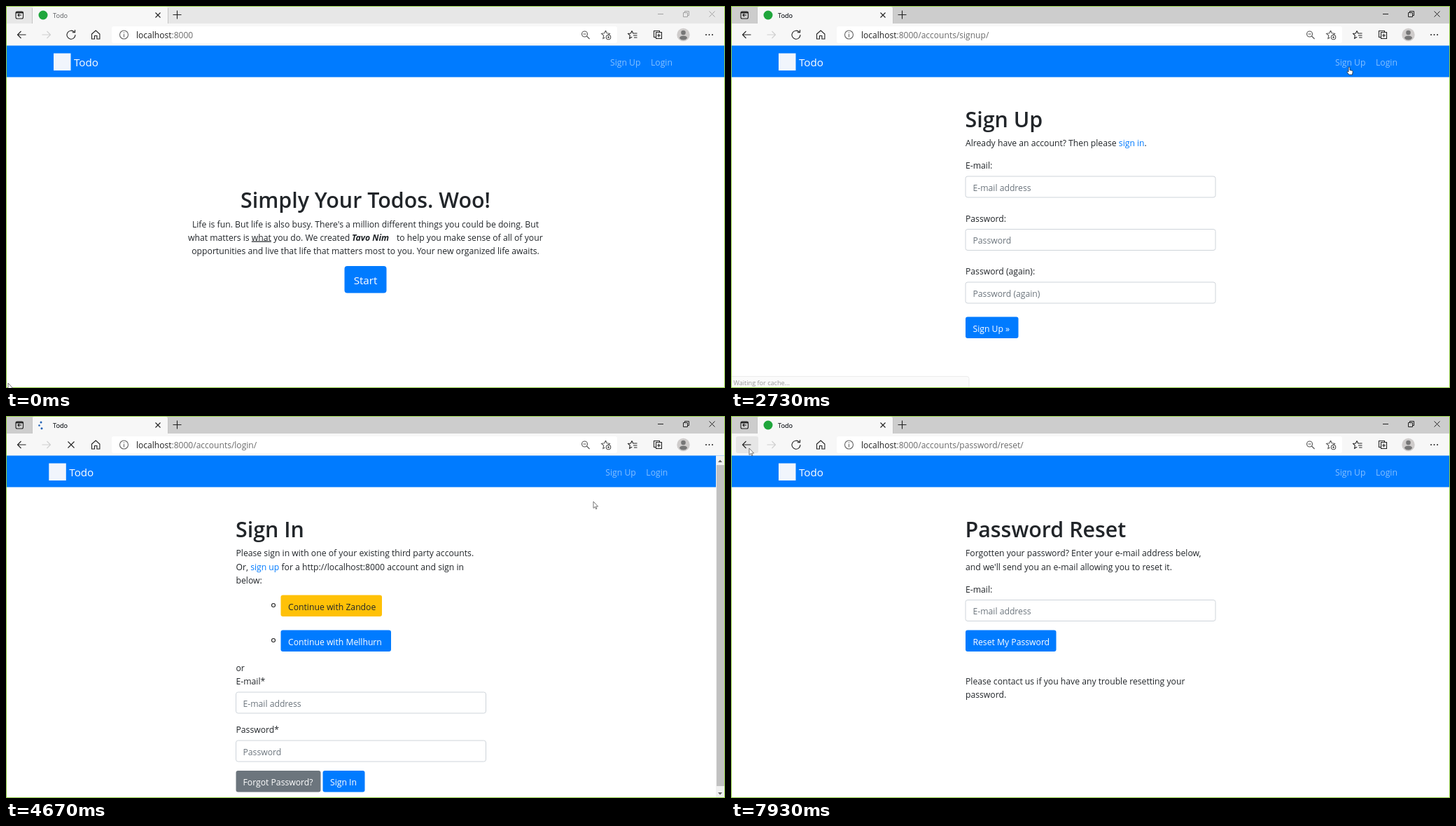
Write an HTML page that moves like this. It is 1027x545 px and loops after 8000 ms.

```html
<!DOCTYPE html>
<html lang="en">
<head>
<meta charset="utf-8">
<title>Todo</title>
<style>
@property --t { syntax: '<number>'; inherits: true; initial-value: 0; }
html, body { margin: 0; width: 100%; height: 100%; overflow: hidden; background: #fff; }
svg { display: block; width: 100%; height: 100%; animation: clock 8s linear infinite; }
text { font: 12.2px 'Open Sans', 'Noto Sans', sans-serif; fill: #212529; white-space: pre; }

/* Visible while the clock is between --a and --b (ms), with --f ms of fade. */
.on {
  --a: -1; --b: 8001; --f: 1;
  opacity: calc(clamp(0, (var(--t) - var(--a)) / var(--f), 1) * clamp(0, (var(--b) - var(--t)) / var(--f), 1));
}
@keyframes clock { from { --t: 0; } to { --t: 8000; } }

.h1 { font-size: 30.4px; font-weight: 600; }
.mid { text-anchor: middle; }
.big { font-size: 15.2px; }
.small { font-size: 9.1px; }
.url { font-size: 12.05px; fill: #6b6b6b; }
.dark { fill: #1f1f1f; }
.white { fill: #fff; }
.link, .blue { fill: #007bff; }
.hint { fill: #6c757d; }
.status { font-size: 9.1px; fill: #444; }
.field { fill: #fff; stroke: #ced4da; }
.bubble { fill: #f7f7f7; stroke: #dcdcdc; }
.line { fill: none; stroke: #222; stroke-width: 1.1; }

.home { --b: 2400; }
.signup { --a: 2400; --b: 4470; }
.login { --a: 4470; --b: 6400; }
.reset { --a: 6400; }

#cursor { animation: roam 8s ease-in-out infinite; }
@keyframes roam {
  0%, .875% { transform: translate(3px, 538px); }
  10.9%, 11.6% { transform: translate(927px, 90px); }
  21.6% { transform: translate(930px, 87px); }
  23.4%, 34.1% { transform: translate(883px, 87px); }
  44.1%, 54.4% { transform: translate(933px, 84px); animation-timing-function: ease-out; }
  58.4% { transform: translate(839px, 122px); animation-timing-function: linear; }
  60% { transform: translate(808px, 145px); animation-timing-function: ease-in-out; }
  68.4%, 72.5% { transform: translate(430px, 414px); }
  76.6%, 85.9% { transform: translate(410px, 530px); }
  95.9%, 96.6% { transform: translate(24px, 54px); }
  99.1%, 100% { transform: translate(26px, 46px); }
}
#spinner { transform-origin: 53px 13px; animation: spin 1s linear -.33s infinite; }
@keyframes spin { to { transform: rotate(360deg); } }
</style>
</head>
<body>
<svg viewBox="0 0 1027 545">
  <defs>
    <g id="nav">
      <rect x="68" y="67.500" width="24.500" height="24.500" fill="#f1f5fc"/>
      <text class="big white" x="97" y="85.500">Todo</text>
      <g opacity=".52">
        <text class="white" x="863" y="84.500">Sign Up</text>
        <text class="white" x="921" y="84.500">Login</text>
      </g>
    </g>
    <rect id="field" class="field" x=".5" y=".5" width="357" height="30" rx="3"/>
    <g id="window" fill="none">
      <path d="M931 11.500h8M1004.500 7.500l8 8m0-8l-8 8"/>
      <path d="M967.500 9.500h6v6h-6zM969.500 9.500v-2h6v6h-2"/>
    </g>
    <path id="hand" d="M-1 1a1 1 0 0 1 2 0V4.500L4.300 5.200Q5.300 5.500 5.200 6.800L4.500 11H-.4L-3 7.300Q-3.200 6-2.200 6L-1 7Z" fill="#fff" stroke="#222" stroke-width=".8"/>
    <path id="arrow" d="M0 0V9.500L2.200 7.500 3.700 10.800 5 10.200 3.600 7.100H6.600Z" fill="#fff" stroke="#555" stroke-width=".8"/>
    <circle id="favicon" cx="53" cy="13" r="6.500" fill="#1fa63c"/>
  </defs>

  <!-- tab strip -->
  <rect width="1027" height="545" fill="#fff"/>
  <rect width="1027" height="26" fill="#e7e7e7"/>
  <rect class="on" style="--a:2270" width="1027" height="26" fill="#cdcdcd"/>
  <rect y="25" width="1027" height="32" fill="#f7f7f7"/>
  <path d="M37.500 26V4q0-3 3-3H228q3 0 3 3V26Z" fill="#f7f7f7"/>
  <path d="M37.500 25V3M231.500 25V3" stroke="#c4c4c4"/>
  <g class="line">
    <rect x="14" y="8" width="10.500" height="10" rx="2"/>
    <path d="M14 9.300h10.500" stroke-width="2.200"/>
    <path d="M22 13h-5m2-2l-2 2 2 2"/>
    <path d="M213.500 9.500l7 7m0-7l-7 7M238.500 12.500h12m-6-6v12"/>
  </g>
  <text class="small" x="67" y="16.500" fill-opacity=".75">Todo</text>
  <text class="small on" style="--a:2270" x="67" y="16.500">Todo</text>
  <use href="#window" class="on" style="--b:2270" stroke="#a2a2a2"/>
  <use href="#window" class="on" style="--a:2270" stroke="#222"/>

  <use href="#favicon" class="on" style="--b:4070"/>
  <g class="on" style="--a:4470;--b:5270">
    <g id="spinner" fill="#1d5fb4">
      <circle cx="50" cy="9" r="1.500"/>
      <circle cx="47.500" cy="13.500" r="1.300"/>
      <circle cx="51" cy="17.800" r="1.500"/>
    </g>
  </g>
  <use href="#favicon" class="on" style="--a:5270;--b:6330"/>
  <path class="on line" style="--a:6400;--b:6670" d="M48.500 7.500h5.500l3.500 3.500v8h-9zM54 7.500V11h3.500"/>
  <use href="#favicon" class="on" style="--a:6670"/>

  <!-- toolbar -->
  <rect x="151" y="29" width="722" height="24" rx="3" fill="#fff"/>
  <rect class="on" style="--a:7700;--f:120" x="7" y="29" width="32" height="24" rx="3" fill="#dadada"/>
  <g class="line">
    <path d="M28.500 41H16.500m5-5l-5 5 5 5"/>
    <path d="M51.500 41h12m-5-5l5 5-5 5" stroke="#cfcfcf"/>
    <path d="M122.500 40l5.700-5 5.700 5v7h-4v-4.500h-3.400V47h-4z"/>
    <circle cx="168.500" cy="41" r="6" stroke="#666"/>
    <path d="M168.500 40v4.500m0-7v1.300" stroke="#666"/>
    <g stroke="#555">
      <circle cx="826.500" cy="40" r="4"/>
      <path d="M829.500 43l4 4M824.500 40h4"/>
      <path d="M856.500 35l1.700 3.800 4.200.5-3 2.800M856.500 35l-1.700 3.800-4.200.5 3.100 2.900-.9 4.200 2.700-1.500"/>
      <circle cx="860.500" cy="44.500" r="3.200"/>
      <path d="M859 44.500h3m-1.500-1.500v3"/>
    </g>
    <path d="M894 35.500l1.700 3.500h5.800M894 35.500L892.300 39l-3.700.5 2.700 2.700-.7 4 3.600-2M896 42h5.500m-4.500 3h4.500"/>
    <path d="M928 44.500h-2.500v-9h8V37M928.500 37.500h8v9h-8zM932.500 39.500v5m-2.500-2.500h5"/>
  </g>
  <g class="on" style="--b:2330"><path id="reload" class="line" d="M97.500 37.200A6 6 0 1 0 99 41M98.500 34v3.800h-3.800"/></g>
  <use href="#reload" class="on" style="--a:2470;--b:4070"/>
  <use href="#reload" class="on" style="--a:5270;--b:6330"/>
  <use href="#reload" class="on" style="--a:6530"/>
  <g class="line">
    <path id="stop" class="on" style="--a:2330;--b:2470" d="M88.500 36.500l9 9m0-9l-9 9"/>
    <path class="on" style="--a:4070;--b:5270" d="M88.500 36.500l9 9m0-9l-9 9"/>
    <path class="on" style="--a:6330;--b:6530" d="M88.500 36.500l9 9m0-9l-9 9"/>
  </g>
  <circle cx="967.500" cy="41" r="9.200" fill="#cfcccb"/>
  <g fill="#777">
    <circle cx="967.500" cy="38" r="3.300"/>
    <path d="M962 46q0-3.500 5.500-3.500T973 46q-2 2.500-5.500 2.500T962 46Z"/>
  </g>
  <g fill="#222">
    <circle cx="1000" cy="41" r="1"/><circle cx="1004.500" cy="41" r="1"/><circle cx="1009" cy="41" r="1"/>
  </g>
  <text class="url on home" x="186" y="45.500"><tspan class="dark">localhost</tspan>:8000</text>
  <text class="url on signup" x="186" y="45.500"><tspan class="dark">localhost</tspan>:8000/accounts/signup/</text>
  <text class="url on login" x="186" y="45.500"><tspan class="dark">localhost</tspan>:8000/accounts/login/</text>
  <text class="url on reset" x="186" y="45.500"><tspan class="dark">localhost</tspan>:8000/accounts/password/reset/</text>

  <!-- navigation bar -->
  <rect class="blue" y="56.500" width="1027" height="45"/>
  <use href="#nav" class="on" style="--b:4470"/>
  <use href="#nav" class="on login" x="-6.700"/>
  <use href="#nav" class="on reset"/>
  <g fill-opacity=".6">
    <text class="white on" style="--a:930;--b:1830" x="921" y="84.500">Login</text>
    <text class="white on" style="--a:1830;--b:2470" x="863" y="84.500">Sign Up</text>
    <text class="white on" style="--a:3400;--b:4470" x="921" y="84.500">Login</text>
  </g>

  <!-- home -->
  <g class="on home">
    <text class="h1 mid" x="513.500" y="288">Simply Your Todos. Woo!</text>
    <text class="mid" x="513.500" y="315.500">Life is fun. But life is also busy. There's a million different things you could be doing. But</text>
    <text x="260" y="334.500">what matters is <tspan text-decoration="underline">what</tspan> you do. We created <tspan x="494" font-weight="700" font-style="italic">Tavo Nim</tspan><tspan x="558">to help you make sense of all of your</tspan></text>
    <text class="mid" x="513.500" y="354">opportunities and live that life that matters most to you. Your new organized life awaits.</text>
    <rect class="blue" x="483.500" y="371" width="60" height="38.500" rx="4"/>
    <text class="big white mid" x="513.500" y="397">Start</text>
  </g>

  <!-- sign up -->
  <g class="on signup">
    <text class="h1" x="334.500" y="172.500">Sign Up</text>
    <text x="335" y="200">Already have an account? Then please <tspan class="link">sign in</tspan>.</text>
    <text x="335" y="232">E-mail:</text>
    <use href="#field" x="334.500" y="242.500"/>
    <text class="hint" x="345.500" y="263.500">E-mail address</text>
    <text x="335" y="307.500">Password:</text>
    <use href="#field" x="334.500" y="318"/>
    <text class="hint" x="345.500" y="339">Password</text>
    <text x="335" y="383">Password (again):</text>
    <use href="#field" x="334.500" y="393.500"/>
    <text class="hint" x="345.500" y="414.500">Password (again)</text>
    <rect class="blue" x="335" y="443.500" width="75.500" height="30.500" rx="3"/>
    <text class="white" x="345.500" y="464.500">Sign Up »</text>
  </g>

  <!-- sign in -->
  <g class="on login">
    <text class="h1" x="328" y="172.500">Sign In</text>
    <text x="328.500" y="200">Please sign in with one of your existing third party accounts.</text>
    <text x="328.500" y="219.500">Or, <tspan class="link">sign up</tspan> for a http://localhost:8000 account and sign in</text>
    <text x="328.500" y="238.500">below:</text>
    <g class="line" stroke-width="1"><circle cx="382" cy="270" r="2.500"/><circle cx="382" cy="320" r="2.500"/></g>
    <rect x="392.500" y="255.500" width="144.500" height="30.500" rx="3" fill="#ffc107"/>
    <text x="403" y="276.500">Continue with Zandoe</text>
    <rect class="blue" x="392.500" y="305.500" width="157.500" height="30.500" rx="3"/>
    <text class="white" x="403" y="326.500">Continue with Mellhurn</text>
    <text x="328.500" y="364">or</text>
    <text x="328.500" y="383">E-mail*</text>
    <use href="#field" x="328" y="393.500"/>
    <text class="hint" x="338.500" y="414.500">E-mail address</text>
    <text x="328.500" y="452">Password*</text>
    <use href="#field" x="328" y="462.500"/>
    <text class="hint" x="338.500" y="483.500">Password</text>
    <rect x="328.500" y="506" width="121" height="30.500" rx="3" fill="#6c757d"/>
    <rect class="on" style="--a:6030" x="328.500" y="506" width="121" height="30.500" rx="3" fill="#5a6268"/>
    <text class="white" x="338.500" y="527">Forgot Password?</text>
    <rect class="blue" x="452.500" y="506" width="60" height="30.500" rx="3"/>
    <text class="white" x="463" y="527">Sign In</text>
    <rect x="1014" y="56.500" width="12" height="488" fill="#f1f1f1"/>
    <rect x="1015" y="70" width="11" height="458" fill="#c1c1c1"/>
    <path d="M1017 66l3-3.500 3 3.500zM1017 537l3 3.500 3-3.500z" fill="#666"/>
  </g>

  <!-- password reset -->
  <g class="on reset">
    <text class="h1" x="334.500" y="172.500">Password Reset</text>
    <text x="335" y="200">Forgotten your password? Enter your e-mail address below,</text>
    <text x="335" y="219.500">and we'll send you an e-mail allowing you to reset it.</text>
    <text x="335" y="251.500">E-mail:</text>
    <use href="#field" x="334.500" y="262"/>
    <text class="hint" x="345.500" y="283">E-mail address</text>
    <rect class="blue" x="335" y="305.500" width="129.500" height="30.500" rx="3"/>
    <text class="white" x="345.500" y="326.500">Reset My Password</text>
    <text x="335" y="383">Please contact us if you have any trouble resetting your</text>
    <text x="335" y="402">password.</text>
  </g>

  <!-- status bubbles -->
  <g class="on" style="--a:930;--b:1830">
    <path class="bubble" d="M0 528.500H138q3 0 3 3V546H0Z"/>
    <text class="status" x="3.500" y="541">localhost:8000/accounts/login/</text>
  </g>
  <g class="on" style="--a:1830;--b:2400">
    <path class="bubble" d="M0 528.500H145q3 0 3 3V546H0Z"/>
    <text class="status" x="3.500" y="541">localhost:8000/accounts/signup/</text>
  </g>
  <g class="on" style="--a:2400;--b:2780;--f:90">
    <path class="bubble" d="M0 528.500H337q3 0 3 3V546H0Z"/>
    <text class="status" x="3.500" y="541">Waiting for cache...</text>
  </g>
  <g class="on" style="--a:3570;--b:4470;--f:60">
    <path class="bubble" d="M0 528.500H138q3 0 3 3V546H0Z"/>
    <text class="status" x="3.500" y="541">localhost:8000/accounts/login/</text>
  </g>
  <g class="on" style="--a:6270;--b:6930;--f:60">
    <path class="bubble" d="M0 528.500H181q3 0 3 3V546H0Z"/>
    <text class="status" x="3.500" y="541">localhost:8000/accounts/password/reset/</text>
  </g>

  <rect x=".5" y=".5" width="1026" height="544" fill="none" stroke="#8cc63f"/>

  <g id="cursor">
    <use href="#arrow" class="on" style="--b:930"/>
    <use href="#hand" class="on" style="--a:930;--b:4450"/>
    <use href="#arrow" class="on" style="--a:4450;--b:6030"/>
    <use href="#hand" class="on" style="--a:6030;--b:6900"/>
    <use href="#arrow" class="on" style="--a:6900"/>
  </g>
</svg>
</body>
</html>
```
